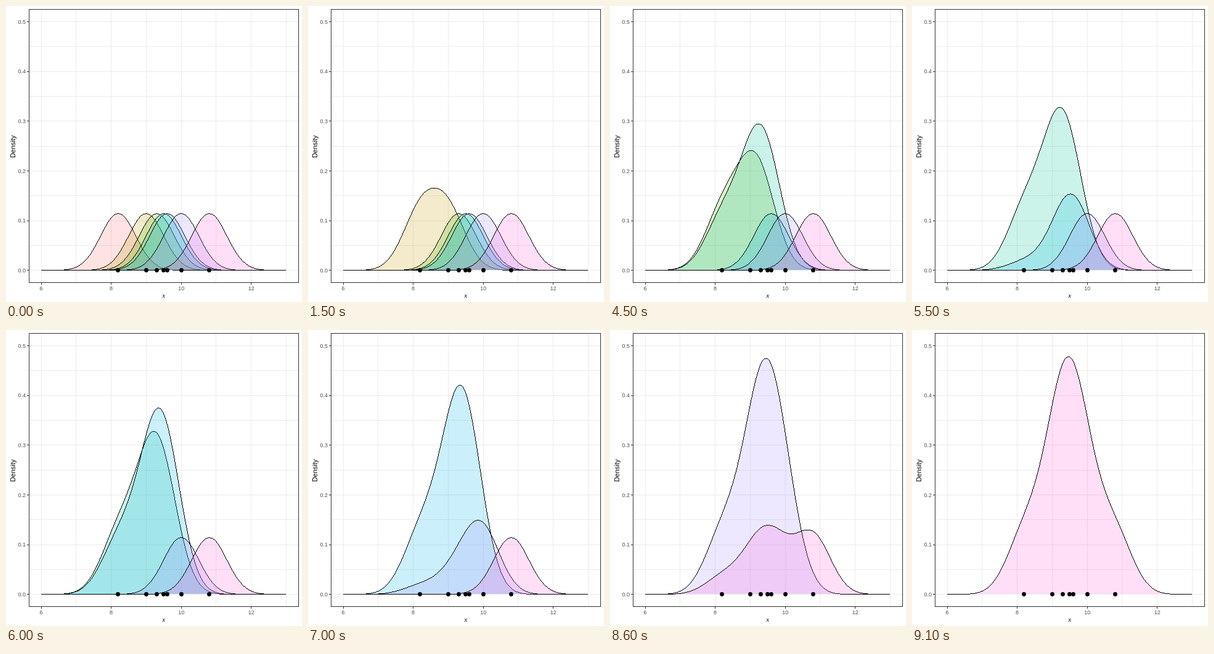
Recreate the animation shown at these times as an HTML page with a canvas. Size 480 by 480 pixels, loop 10 s.

```html
<!DOCTYPE html>
<html lang="en">
<head>
<meta charset="utf-8">
<title>Kernel density sum</title>
<style>
  html, body { margin: 0; width: 100%; height: 100%; overflow: hidden; background: #fff; }
  canvas, svg { position: absolute; left: 0; top: 0; width: 480px; height: 480px; }
  text { text-anchor: middle; font-family: "Liberation Sans", Arial, sans-serif; }
  .tick { font-size: 9px; fill: #4d4d4d; }
  .title { font-size: 11px; fill: #000; }
  .var { font-family: "Liberation Serif", "Times New Roman", serif; font-style: italic; }
  .end { text-anchor: end; }
</style>
</head>
<body>
<canvas id="plot" width="480" height="480"></canvas>
<svg id="labels" viewBox="0 0 480 480">
  <text class="title" transform="translate(15 228) rotate(-90)">Density</text>
  <text class="title var" x="255.7" y="473">x</text>
</svg>
<script>
const ctx = document.getElementById('plot').getContext('2d');
const labels = document.getElementById('labels');

const points = [8.2, 9, 9.3, 9.5, 9.6, 10, 10.8];
const colors = ['#F8766D', '#C49A00', '#53B400', '#00C094', '#00B6EB', '#A58AFF', '#FB61D7'];
const starts = [900, 2500, 4000, 5500, 7000, 8500];
const LOOP = 10000, STEP = 100, STEPS = 7, BANDWIDTH = 0.5;
const X6 = 57.04, UX = 56.79, Y0 = 428.8, UY = 806.3;
const LEFT = 57, RIGHT = 454, BASE = 428;
const box = { l: 37, t: 5, r: 474, b: 448 };

const px = x => X6 + (x - 6) * UX;
const py = d => Y0 - d * UY;
const norm = 1 / (points.length * BANDWIDTH * Math.sqrt(2 * Math.PI));
const kernel = (i, x) => norm * Math.exp(-0.5 * ((x - points[i]) / BANDWIDTH) ** 2);

// kernel i plus a share of all kernels before it
function density(i, share, x) {
  let d = kernel(i, x);
  if (share) for (let j = 0; j < i; j++) d += share * kernel(j, x);
  return d;
}

function rect(color, x, y, w, h) {
  ctx.fillStyle = color;
  ctx.fillRect(x, y, w, h);
}

function drawGrid() {
  rect('#fff', 0, 0, 480, 480);
  for (let x = 6; x <= 13; x++) {
    rect('#ebebeb', Math.floor(px(x)), box.t, 1, box.b - box.t);
  }
  for (let i = 0; i <= 10; i++) {
    rect('#ebebeb', box.l, Math.floor(py(i / 20)), box.r - box.l, 1);
  }
}

// pixel columns keep the edges hard
function drawArea(i, share) {
  const row = c => Math.floor(py(density(i, share, 6 + (c - X6) / UX)));
  ctx.globalAlpha = 0.2;
  for (let c = LEFT; c < RIGHT; c++) {
    const top = row(c + 0.5);
    rect(colors[i], c, top, 1, BASE - top);
  }
  ctx.globalAlpha = 1;
  for (let c = LEFT; c < RIGHT; c++) {
    const a = row(c), b = row(c + 1);
    rect('#000', c, Math.min(a, b), 1, Math.max(1, Math.abs(a - b)));
  }
}

function drawPoints() {
  ctx.fillStyle = '#000';
  for (const p of points) {
    ctx.beginPath();
    ctx.arc(Math.floor(px(p)) + 0.5, BASE + 0.5, 3.4, 0, 2 * Math.PI);
    ctx.fill();
  }
}

function drawFrame() {
  ctx.strokeStyle = '#333';
  ctx.lineWidth = 1;
  ctx.strokeRect(box.l + 0.5, box.t + 0.5, box.r - box.l, box.b - box.t);
  for (let x = 6; x <= 12; x += 2) rect('#333', Math.floor(px(x)), box.b + 1, 1, 3);
  for (let i = 0; i <= 5; i++) rect('#333', box.l - 3, Math.floor(py(i / 10)), 3, 1);
}

function draw(t) {
  const k = starts.filter(s => t >= s).length;
  const step = k ? Math.floor((t - starts[k - 1]) / STEP) + 1 : STEPS;
  const share = Math.min(1, step / STEPS);
  drawGrid();
  if (share < 1) drawArea(k - 1, 1);
  drawArea(k, share);
  for (let i = k + 1; i < points.length; i++) drawArea(i, 0);
  drawPoints();
  drawFrame();
}

function addLabel(str, x, y, cls) {
  const el = document.createElementNS('http://www.w3.org/2000/svg', 'text');
  el.setAttribute('class', cls);
  el.setAttribute('x', x);
  el.setAttribute('y', y);
  el.textContent = str;
  labels.append(el);
}

for (let x = 6; x <= 12; x += 2) addLabel(x, px(x), 461, 'tick');
for (let i = 0; i <= 5; i++) {
  addLabel((i / 10).toFixed(1), 32, Math.round(py(i / 10) + 3.2), 'tick end');
}

const begin = performance.now();
function tick() {
  draw((performance.now() - begin) % LOOP);
  requestAnimationFrame(tick);
}
tick();
</script>
</body>
</html>
```
